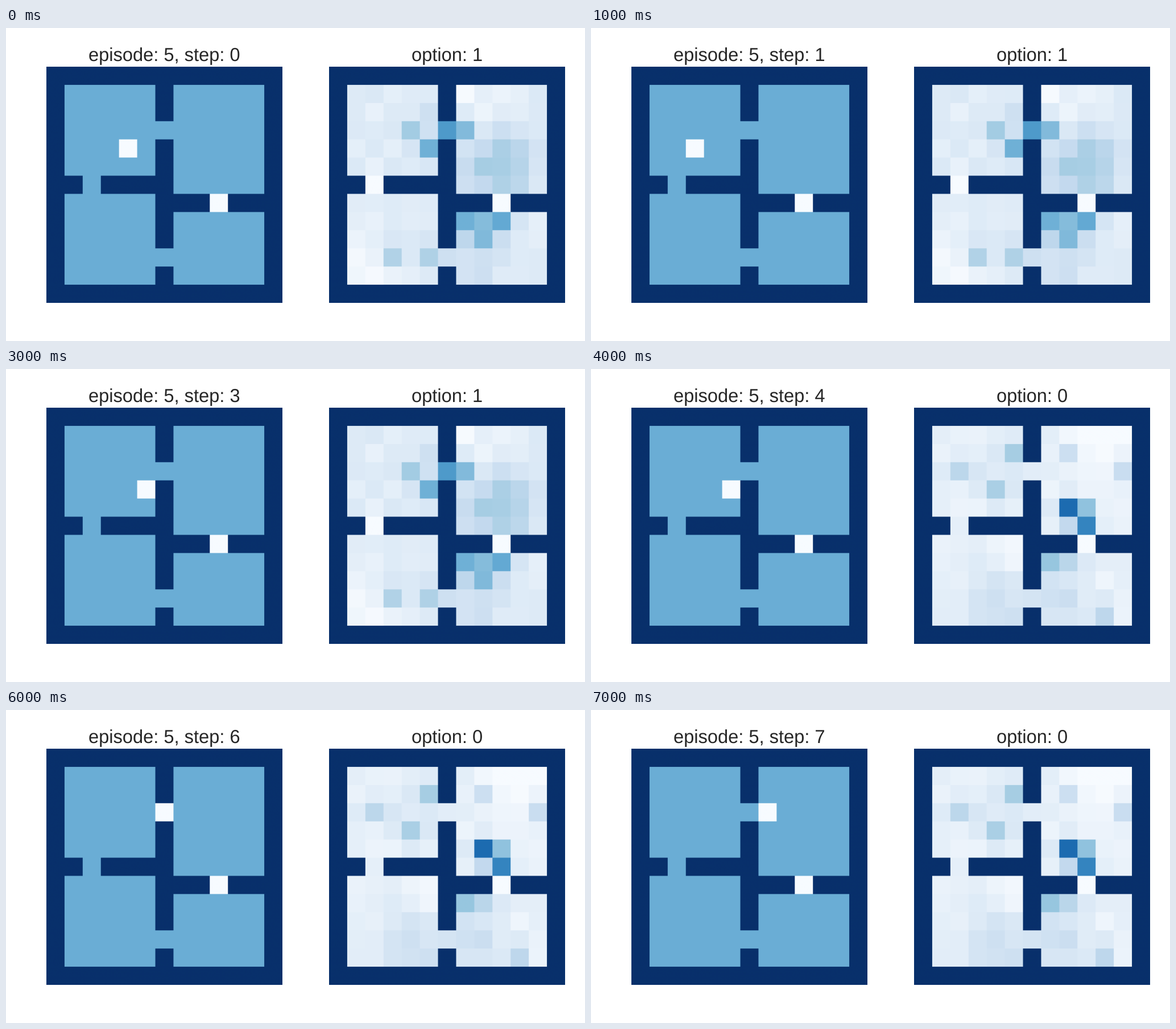
A matplotlib script that plays this animation: 1018x550 px, repeating every 8000 ms.

```python
import numpy as np
import matplotlib.pyplot as plt
from matplotlib.animation import FuncAnimation

W, H, DPI = 1018, 550, 100
TOP, SIDE = 68.1, 414.7
LEFT_WORLD, LEFT_HEAT = 71.2, 568.4
TITLE_PX, TITLE_PAD_PX = 32.7, 9.6
CELLS, CELL_PX = 13, 32
POINTS_PER_PX = 72 / DPI

GOAL = (7, 9)
DOORS = [(3, 6), (10, 6), (6, 2), GOAL]

# (row, column) moves of the agent, one per step
STAY, UP, LEFT, RIGHT = (0, 0), (-1, 0), (0, -1), (0, 1)
START = (4, 4)
MOVES = [LEFT, RIGHT, RIGHT, STAY, UP, RIGHT, RIGHT]
PATH = np.cumsum([START] + MOVES, axis=0)
SWITCH_STEP = 4

# Per option: seed, range of the background noise, and bumps as
# (row, column, height); spots cover one cell, hills a neighbourhood.
SPOT_RADIUS, HILL_RADIUS = 0.45, 1.4
OPTIONS = {
    1: dict(
        seed=3, noise=(0.07, 0.15),
        spots=[(3, 6, 0.44), (4, 5, 0.38), (3, 7, 0.26), (3, 4, 0.22),
               (2, 5, 0.14), (8, 7, 0.31), (8, 9, 0.35), (8, 8, 0.19),
               (9, 8, 0.24), (10, 3, 0.27), (10, 5, 0.20), (6, 2, -0.15)],
        hills=[(5, 8.9, 0.27), (9.7, 7.5, 0.11), (10.7, 1, -0.11),
               (1.3, 7.5, -0.07)],
    ),
    0: dict(
        seed=8, noise=(0.03, 0.11),
        spots=[(5, 8, 0.69), (6, 9, 0.57), (5, 9, 0.26), (6, 8, 0.10),
               (8, 7, 0.26), (8, 8, 0.17), (4, 4, 0.26), (2, 5, 0.26),
               (3, 2, 0.18), (2, 8, 0.20), (3, 11, 0.19), (11, 10, 0.20)],
        hills=[(10, 4, 0.11), (9.7, 7, 0.15), (3, 4.5, 0.06),
               (1, 10, -0.08), (7.3, 5, -0.06)],
    ),
}

plt.rcParams["font.family"] = "Liberation Sans"
plt.rcParams["text.hinting"] = "none"


def four_rooms():
    free = np.zeros((CELLS, CELLS), bool)
    free[1:-1, 1:-1] = True
    free[:, 6] = False
    free[6, :6] = False
    free[7, 7:] = False
    for door in DOORS:
        free[door] = True
    return free


def bump(row, col, height, radius):
    rows, cols = np.indices((CELLS, CELLS))
    dist2 = (rows - row) ** 2 + (cols - col) ** 2
    return height * np.exp(-dist2 / (2 * radius ** 2))


def heat_map(seed, noise, spots, hills):
    grid = np.random.default_rng(seed).uniform(*noise, (CELLS, CELLS))
    grid += sum(bump(*spot, SPOT_RADIUS) for spot in spots)
    grid += sum(bump(*hill, HILL_RADIUS) for hill in hills)
    grid[GOAL] = 0
    return np.where(FREE, grid.clip(0, 1), 1)


def world_map(step):
    grid = np.where(FREE, 0.5, 1.0)
    grid[GOAL] = grid[tuple(PATH[step])] = 0
    return grid


def enlarge(grid):
    """Blow cells up to about pixel size, so their edges blend by one pixel."""
    return np.kron(grid, np.ones((CELL_PX, CELL_PX)))


def panel(left):
    ax = fig.add_axes([left / W, 1 - (TOP + SIDE) / H, SIDE / W, SIDE / H])
    ax.axis("off")
    image = ax.imshow(enlarge(np.ones((CELLS, CELLS))), cmap="Blues",
                      vmin=0, vmax=1, aspect="auto",
                      interpolation="bilinear", interpolation_stage="rgba")
    title = ax.set_title("", fontsize=TITLE_PX * POINTS_PER_PX,
                         color="#262626", pad=TITLE_PAD_PX * POINTS_PER_PX)
    return image, title


FREE = four_rooms()
HEAT = {option: heat_map(**spec) for option, spec in OPTIONS.items()}

fig = plt.figure(figsize=(W / DPI, H / DPI), dpi=DPI, facecolor="white")
world_image, world_title = panel(LEFT_WORLD)
heat_image, heat_title = panel(LEFT_HEAT)


def draw(step):
    option = 1 if step < SWITCH_STEP else 0
    world_image.set_data(enlarge(world_map(step)))
    world_title.set_text(f"episode: 5, step: {step}")
    heat_image.set_data(enlarge(HEAT[option]))
    heat_title.set_text(f"option: {option}")
    return world_image, world_title, heat_image, heat_title


anim = FuncAnimation(fig, draw, frames=len(PATH), interval=1000,
                     repeat=True, repeat_delay=0)
plt.show()
```
